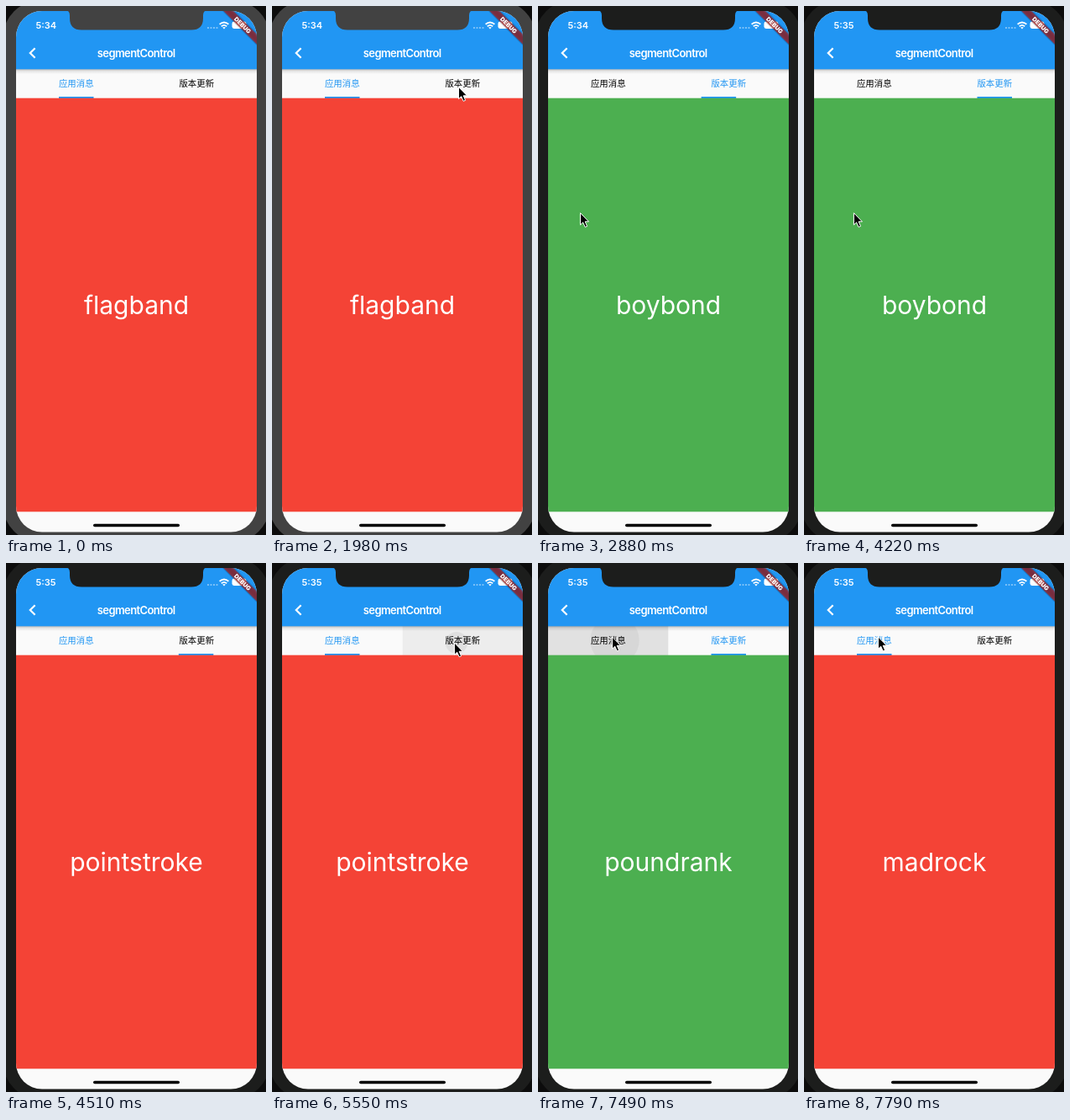
An HTML page for the animation above (8000 ms loop, 310 by 630 pixels).

```html
<!DOCTYPE html>
<html lang="zh-CN">
<head>
<meta charset="utf-8">
<title>segmentControl</title>
<style>
  html, body { margin: 0; width: 100%; height: 100%; overflow: hidden; background: #000; }
  svg { display: block; width: 310px; height: 630px; }
  text { font-family: Inter, Roboto, sans-serif; }
  .tab { font: 500 10.4px "Noto Sans CJK SC", "Noto Sans CJK", sans-serif; text-anchor: middle; }
</style>
</head>
<body>
<svg viewBox="0 0 310 630">
  <defs>
    <clipPath id="screen"><rect x="12" y="6" width="287" height="620.5" rx="31"/></clipPath>
    <clipPath id="leftTab"><rect x="12" y="75" width="143.5" height="35"/></clipPath>
    <clipPath id="rightTab"><rect x="155.5" y="75" width="143.5" height="35"/></clipPath>
    <linearGradient id="shade" x2="0" y2="1">
      <stop stop-opacity=".28"/><stop offset=".4" stop-opacity=".09"/><stop offset="1" stop-opacity="0"/>
    </linearGradient>
    <filter id="blur"><feGaussianBlur stdDeviation="1.8"/></filter>
  </defs>

  <rect width="310" height="630" fill="#0c0c0c"/>
  <rect class="bezel" x="-4" y="-7" width="319" height="646" rx="46"/>

  <g clip-path="url(#screen)">
    <rect x="12" y="6" width="287" height="621" fill="#fafafa"/>

    <g id="leftInk" clip-path="url(#leftTab)">
      <rect x="12" y="75" width="143.5" height="35" fill="#bcbcbc"/><circle cy="92" fill="#c8c8c8"/>
    </g>
    <g id="rightInk" clip-path="url(#rightTab)">
      <rect x="155.5" y="75" width="143.5" height="35" fill="#bcbcbc"/><circle cy="95" fill="#c8c8c8"/>
    </g>
    <text id="leftLabel" class="tab" x="83.75" y="95.5">应用消息</text>
    <text id="rightLabel" class="tab" x="227.25" y="95.5">版本更新</text>
    <rect id="indicator" y="108" width="41.5" height="2" fill="#2196f3"/>

    <rect id="page" x="12" y="109.7" width="287" height="492.6"/>
    <text id="word" x="155.5" y="367" font-size="30" text-anchor="middle" fill="#fff"></text>

    <rect x="12" y="75" width="287" height="6" fill="url(#shade)"/>
    <rect x="12" y="6" width="287" height="69.3" fill="#2196f3"/>
    <path d="M34.6 50.2 28.8 56l5.8 5.8" fill="none" stroke="#fff" stroke-width="2.2"/>
    <text x="155.2" y="60.6" font-size="13" font-weight="600" letter-spacing="-.6" text-anchor="middle" fill="#fff">segmentControl</text>

    <text id="clock" x="35.5" y="27" font-size="11" font-weight="600" fill="#fff"></text>
    <path d="M240 26h13" stroke="#fff" stroke-opacity=".4" stroke-width="2" stroke-dasharray="2 1.5"/>
    <g fill="none" stroke="#fff" stroke-width="1.8">
      <path d="M254.6 21.8q5.4-4.6 10.8 0"/><path d="M256.8 24.2q3.2-2.6 6.4 0"/>
    </g>
    <path d="M258.2 25.6q1.8-1.2 3.6 0L260 27.6z" fill="#fff"/>
    <rect x="269.5" y="18.5" width="17" height="8.5" rx="2.4" fill="#fff"/>

    <g transform="translate(299 6) rotate(45)">
      <rect x="-30" y="19.7" width="60" height="8.3" opacity=".5" filter="url(#blur)"/>
      <rect x="-30" y="19.7" width="60" height="8.3" fill="#b71c1c" fill-opacity=".63"/>
      <text y="26.4" font-size="7.1" font-weight="900" text-anchor="middle" fill="#fff">DEBUG</text>
    </g>
    <rect x="104" y="616.8" width="103" height="3.5" rx="1.75"/>
  </g>

  <path class="bezel" d="M70 5q6 0 6 6v3.5q0 14 14 14h131q14 0 14-14V11q0-6 6-6z"/>

  <g clip-path="url(#screen)">
    <path id="cursor" d="M.5.5v14.2l3.2-3 2.5 5.6 2.4-1-2.4-5.5h4.3z" stroke="#fff" stroke-width="1"/>
  </g>
</svg>

<script>
const LOOP = 8000, SLIDE = 190, INK_FADE = 190;
const $ = id => document.getElementById(id);
const set = (el, attrs) => { for (const k in attrs) el.setAttribute(k, attrs[k]); };
const clamp = v => Math.max(0, Math.min(1, v));
const smooth = p => p * p * (3 - 2 * p);

// CSS "ease": cubic-bezier(.25, .1, .25, 1)
function ease(p) {
  const bezier = (a, b, u) => 3 * a * u * (1 - u) ** 2 + 3 * b * u * u * (1 - u) + u ** 3;
  let lo = 0, hi = 1;
  for (let i = 0; i < 18; i++) {
    const mid = (lo + hi) / 2;
    if (bezier(.25, .25, mid) < p) lo = mid; else hi = mid;
  }
  return bezier(.1, 1, lo);
}

const pages = [
  { at: -SLIDE, tab: 0, word: "flagband" },
  { at: 2757, tab: 1, word: "boybond" },
  { at: 4509, tab: 0, word: "pointstroke" },
  { at: 5806, tab: 1, word: "poundrank" },
  { at: 7560, tab: 0, word: "madrock" }
];
const presses = [
  { ink: $("leftInk"), down: 7160, up: 7560, x: 91.5 },
  { ink: $("rightInk"), down: 5450, up: 5806, x: 220 }
];
// time, x, y of the pointer tip
const route = [
  [500, 165, 488], [1540, 222, 95], [1980, 222, 96], [2100, 222, 96], [2400, 206, 235],
  [2560, 205, 245], [2880, 50, 246], [3400, 43, 240], [4070, 56, 246], [4300, 60, 246],
  [4480, 320, 250], [4950, 320, 235], [5300, 226, 112], [5450, 217, 94.5],
  [6350, 217, 94.5], [7130, 88, 87.5], [LOOP, 88, 87.5]
];

function drawPointer(t) {
  $("cursor").style.display = t < route[0][0] ? "none" : "";
  const i = Math.max(1, route.findIndex(stop => stop[0] > t));
  const [t0, x0, y0] = route[i - 1], [t1, x1, y1] = route[i];
  const p = smooth(clamp((t - t0) / (t1 - t0)));
  set($("cursor"), { transform: `translate(${x0 + (x1 - x0) * p} ${y0 + (y1 - y0) * p})` });
}

function drawInk({ ink, down, up, x }, t) {
  const alpha = .4 * clamp(1 - (t - up) / INK_FADE);
  const [highlight, splash] = ink.children;
  const held = Math.max(0, Math.min(t, up) - down), released = Math.max(0, t - up);
  set(highlight, { opacity: alpha * clamp(held / 200) });
  set(splash, {
    cx: x, opacity: held ? alpha : 0,
    r: held ? 6 + .07 * held + .41 * released : 0
  });
}

function draw(t) {
  const { at, tab, word } = pages.findLast(page => page.at <= t);
  const slid = ease(clamp((t - at) / SLIDE));
  const position = tab ? slid : 1 - slid;
  set($("indicator"), { x: 63 + 143.5 * position });
  set($("page"), { fill: tab ? "#4caf50" : "#f44336" });
  set($("leftLabel"), { fill: tab ? "#000" : "#2196f3" });
  set($("rightLabel"), { fill: tab ? "#2196f3" : "#000" });
  $("word").textContent = word;
  $("clock").textContent = t < 3600 ? "5:34" : "5:35";
  for (const el of document.querySelectorAll(".bezel")) set(el, { fill: t < 2560 ? "#424242" : "#1c1d1c" });
  for (const press of presses) drawInk(press, t);
  drawPointer(t);
}

const start = performance.now();
function tick() {
  draw((performance.now() - start) % LOOP);
  requestAnimationFrame(tick);
}
tick();
</script>
</body>
</html>
```
